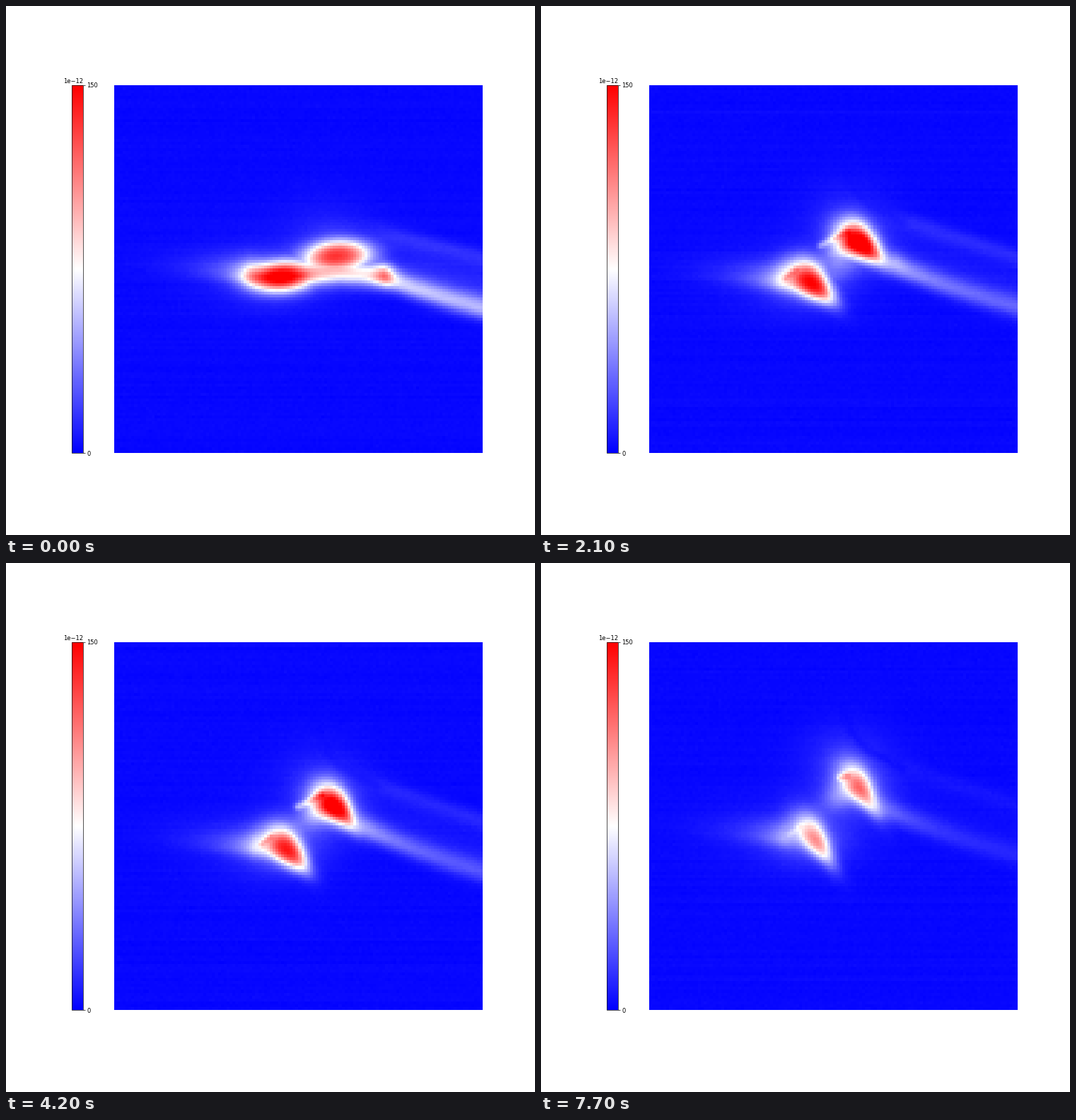
These frames come from a looping animation (748x748 px, 8400 ms). A matplotlib script:

```python
import numpy as np
import matplotlib.pyplot as plt
from matplotlib.animation import FuncAnimation

SIZE, DPI, CELLS = 748, 60, 128
LEFT, TOP, SIDE = 152.7, 111.7, 520.4
RIGHT = LEFT + SIDE
FRAMES, INTERVAL = 12, 700

# Places the upper drop passes through, evenly spaced in time after the first step.
DRIFT_TIMES = [0, 1, 3, 5, 7, 9, 11]
DRIFT = [(470, 354), (460, 320), (453, 337), (481, 349), (451, 343), (452, 325), (452, 320)]

axis = (np.arange(CELLS) + 0.5) * SIDE / CELLS
X, Y = np.meshgrid(LEFT + axis, TOP + axis)


def sigmoid(z):
    return 1 / (1 + np.exp(-np.clip(z, -40, 40)))


def glow(center, sx, sy, tilt=0.0):
    dx, dy = X - center[0], Y - center[1]
    return np.exp(-0.5 * ((dx / sx) ** 2 + ((dy - tilt * dx) / sy) ** 2))


def ridge(line, above, below):
    d = Y - line
    return np.exp(-(d / np.where(d < 0, above, below)) ** 2)


def distance(a, b):
    (ax, ay), (dx, dy) = a, np.subtract(b, a)
    t = np.clip(((X - ax) * dx + (Y - ay) * dy) / (dx * dx + dy * dy), 0, 1)
    return np.hypot(X - ax - t * dx, Y - ay - t * dy)


def streak(points, width):
    gap = np.min([distance(a, b) for a, b in zip(points, points[1:])], axis=0)
    return np.exp(-(gap / width) ** 2)


def drop(center, length, width, angle, taper, soft):
    """Soft ellipse that narrows along its axis."""
    dx, dy = X - center[0], Y - center[1]
    along = dx * np.cos(angle) + dy * np.sin(angle)
    across = dy * np.cos(angle) - dx * np.sin(angle)
    half = width * (1 - taper * np.clip(along / length, -1, 1))
    return sigmoid((1 - np.hypot(along / length, across / half)) * width / soft)


def field(frame):
    split = 1 - np.exp(-frame / 1.2)
    fade = np.clip((frame - 5) / 6, 0, 1)

    def stage(merged, apart, faded):
        return merged + (apart - merged) * split + (faded - apart) * fade

    upper = np.array([np.interp(frame, DRIFT_TIMES, track) for track in zip(*DRIFT)])
    lower = upper + (stage(-80, -69, -64), stage(29, 58, 72))
    tip = upper + (stage(60, 40, 32), 28)
    end = lower[1] + stage(45, 33, 22)

    # Diffuse light around both drops
    v = 0.14 * glow(upper + (-6, 0), 32, 26)
    v += stage(0.025, 0.045, 0.06) * glow(upper + (-22, -38), 45, 38)
    v += 0.13 * glow(lower + (-8, 0), 38, 23)
    v += 0.03 * glow(lower + (-40, -5), 75, 38)
    v += stage(0.02, 0.2, 0.15) * glow(upper + (-31, 10), 18, 15, -0.3)

    # Wedge to the left of the lower drop
    reach = lower[0] - 48 - X
    wedge = ridge(lower[1] - 3 - 0.1 * reach, 24, 14)
    v += stage(0.27, 0.28, 0.2) * wedge * np.where(
        reach > 0, np.exp(-np.abs(reach) / 48), np.exp(-(reach / 22) ** 2))

    # Tails that leave on the right
    run = np.clip((X - tip[0]) / (RIGHT - tip[0]), 0, 1)
    line = tip[1] + (end - tip[1]) * (run + 0.25 * run * (1 - run))
    far, near = stage(0.31, 0.15, 0.05), stage(0.45, 0.33, 0.2)
    power = far + (near - far) * np.exp(-np.maximum(X - tip[0], 0) / 55)
    v += power * ridge(line, 18, 15) * sigmoid((X - tip[0] + 4) / 7)
    v += 0.2 * far * ridge(line - 28, 35, 28) * sigmoid((X - tip[0] - 25) / 15)
    start = upper + (30, -42)
    slope = (end - 72 - start[1]) / (RIGHT - start[0])
    v += stage(0.07, 0.065, 0.025) * ridge(
        start[1] + slope * (X - start[0]), 12, 15) * sigmoid((X - start[0] - 25) / 12)

    # Curved shadow over the upper drop
    shadow = upper + np.array([(-28, -118), (-14, -82), (6, -57), (58, -30)])
    v *= 1 - stage(0, 0.3, 0.6) * streak(shadow, 7)

    # Bright bodies with a hot core, joined by a bridge until they part
    length, width = stage(50, 41, 38), stage(23, 23, 16)
    angle, taper = np.radians(stage(-4, 46, 57)), stage(0, 0.35, 0.3)
    bridge = (1 - split ** 2) * streak([lower, upper + (0, 22), tip], 17)
    bodies = [drop(c, length, width, angle, taper, 5) for c in (upper, lower)]
    v += 0.45 * np.max(bodies + [bridge], axis=0)
    for center, heat in ((upper, stage(0.28, 0.5, 0.16)), (lower, stage(0.45, 0.4, 0.14))):
        v += heat * drop(center, 0.62 * length, 0.6 * width, angle, taper, 3.5)

    # Fine bright strokes at the upper left of each drop
    arch = upper + np.array([(stage(-58, -58, -30), stage(2, 2, -16)), (-20, -18)])
    v += 0.2 * split ** 2 * streak(arch, 5)
    v += stage(0, 0.13, 0.06) * streak(lower + np.array([(-37, -8), (-23, -19)]), 4)

    rng = np.random.default_rng(frame)
    noise = rng.normal(0, 0.0025, (CELLS, 1)) + rng.normal(0, 0.0025, v.shape)
    return np.clip(v + 0.014 + noise, 0, 1) * 150


def box(x, y, w, h):
    return [x / SIZE, 1 - (y + h) / SIZE, w / SIZE, h / SIZE]


fig = plt.figure(figsize=(SIZE / DPI, SIZE / DPI), dpi=DPI, facecolor="white")
ax = fig.add_axes(box(LEFT, TOP, SIDE, SIDE))
ax.axis("off")
image = ax.imshow(field(0), cmap="bwr", vmin=0, vmax=150,
                  interpolation="nearest", aspect="auto")

scale = fig.add_axes(box(93, TOP, 15.6, SIDE))
fig.colorbar(image, cax=scale, ticks=[0, 150])
fig.text(108.6 / SIZE, 1 - (TOP - 2.5) / SIZE, "1e\u221212", fontsize=10,
         ha="right", va="baseline")


def update(frame):
    image.set_data(field(frame))
    return [image]


anim = FuncAnimation(fig, update, frames=FRAMES, interval=INTERVAL,
                     repeat=True, repeat_delay=0)
plt.show()
```
